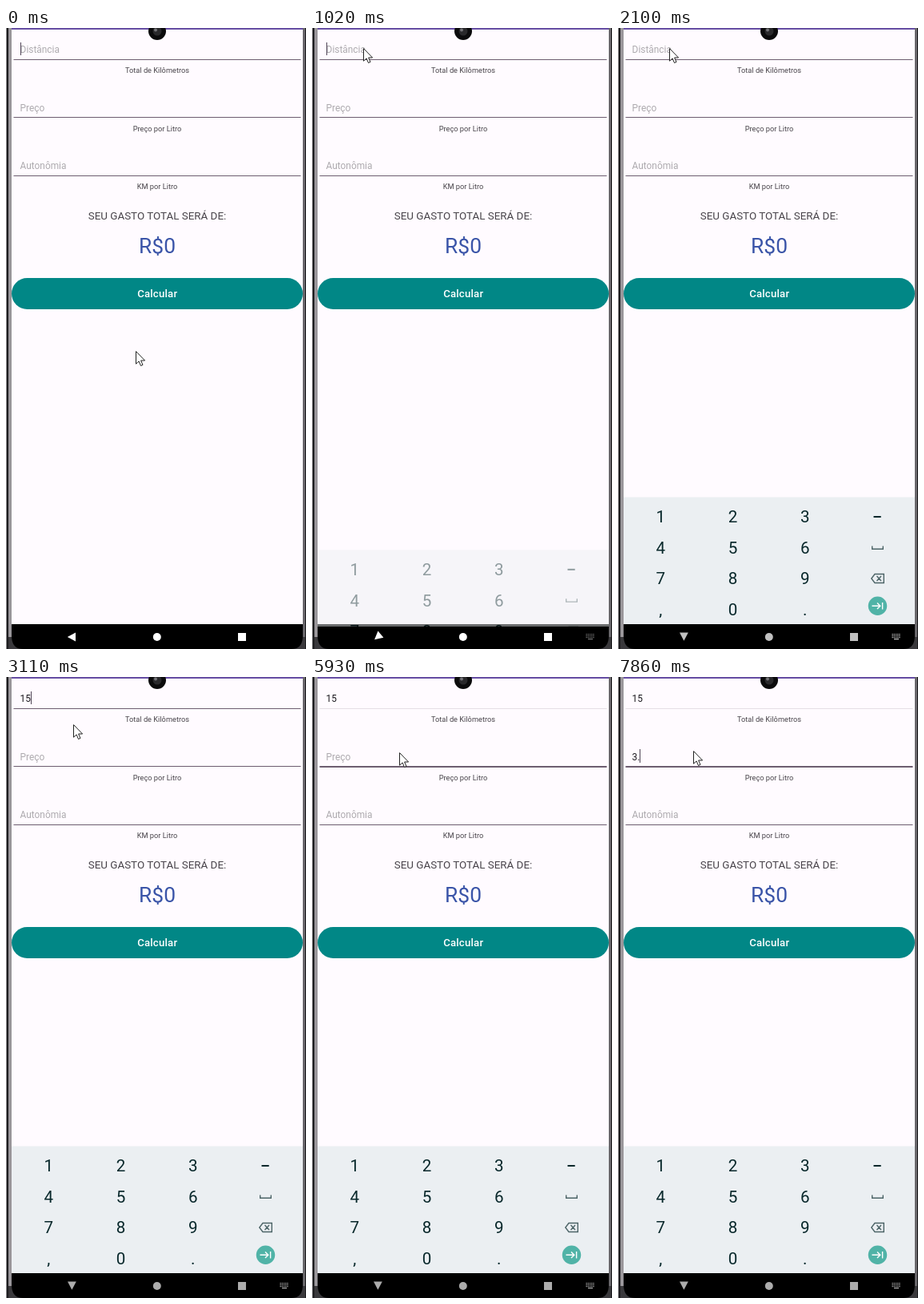
Recreate the animation shown at these times as an HTML page. Size 375 px wide and 775 px high, loop 8000 ms.

```html
<!DOCTYPE html>
<html lang="pt">
<head>
<meta charset="utf-8">
<title>Calculadora de gasto</title>
<style>
  html, body { margin: 0; width: 100%; height: 100%; overflow: hidden; background: #fffbff; }
  svg { display: block; width: 375px; height: 775px; }
  text { font-family: Roboto, "Noto Sans", sans-serif; }
  .mid { text-anchor: middle; }
  .label { font-size: 9.25px; fill: #49454b; }
  .hint, .value { font-size: 11.88px; }
  .hint { fill: #aeabaf; }
  .hint.pressed { fill: #7b777d; }
  .value { fill: #1d1b20; }
  .key { font-size: 20.6px; fill: #08282b; text-anchor: middle; }
  .glyph { fill: none; stroke: #4c6467; stroke-width: 1.4; }
  #tap { mix-blend-mode: multiply; }
</style>
</head>
<body>
<svg viewBox="0 0 375 775">
  <!-- phone body -->
  <rect width="375" height="775" fill="#1b1b1d"/>
  <rect width="1" height="775" fill="#8b898c"/>
  <rect x="3" width="4" height="775" fill="#9a979b"/>
  <rect x="371" width="3" height="775" fill="#69676b"/>
  <path d="M3 760H374V775H3Z" fill="#3a393c"/>
  <path d="M7 744H371V758Q371 775 357 775H21Q7 775 7 758Z" fill="#000"/>

  <!-- app -->
  <rect x="7" width="364" height="744" fill="#fffbff"/>
  <rect x="7" width="364" height="2" fill="#6750a4"/>
  <circle cx="189" cy="4" r="11" fill="#0b0b0c"/>
  <circle cx="189" cy="4" r="5.5" fill="#29292b"/>
  <circle cx="187" cy="2.5" r="2" fill="#737377"/>
  <g id="fields"></g>
  <text class="mid" x="189" y="239.2" font-size="13.4" fill="#49454b">SEU GASTO TOTAL SERÁ DE:</text>
  <text class="mid" x="189" y="280.8" font-size="26.4" fill="#3a54a8">R$0</text>
  <rect x="7" y="312" width="364" height="39" rx="19.5" fill="#018786"/>
  <text class="mid" x="189.2" y="336.2" font-size="13.2" font-weight="500" letter-spacing=".2" fill="#fff">Calcular</text>

  <!-- keyboard -->
  <clipPath id="screen"><rect x="7" width="364" height="747"/></clipPath>
  <g clip-path="url(#screen)">
    <g id="board">
      <rect x="7" y="585.5" width="364" height="158.5" fill="#ebeff2"/>
      <g id="keys"></g>
      <path class="glyph" d="M319.5 610H328.7" style="stroke:#08282b;stroke-width:2"/>
      <path class="glyph" d="M317.7 646.5V650.3H331.3V646.5"/>
      <path class="glyph" d="M321 681.5H332.3V692.5H321L316.8 687ZM323.5 684L329 690M329 684L323.5 690"/>
      <circle cx="324.5" cy="721.3" r="11.7" fill="#50b3a7"/>
      <path class="glyph" d="M317.5 721.3H327.5M324 717.5L327.8 721.3L324 725.1M330.6 717V725.6" style="stroke:#fff"/>
    </g>
  </g>

  <!-- navigation bar -->
  <g id="nav">
    <path id="back" d="M-5.6 0L4.6 -5.4V5.4Z"/>
    <circle cx="188.8" cy="760" r="5"/>
    <rect x="290" y="755" width="10" height="10"/>
    <g id="switcher"></g>
  </g>

  <rect id="caret" width="1" fill="#4f4456"/>
  <path id="pointer" d="M.5 .6V16.2L4.1 12.9L6.5 18.5L9 17.4L6.6 12H11.6Z" fill="#fff" stroke="#222"/>
  <circle id="tap" r="12" fill="#fffa76"/>
</svg>
<script>
const LOOP = 8000, FRAME = 78, BLINK = 490, TEXT_X = 17.6, ROW = 72.6;
const KEYBOARD = 980, DIM = 1800, FOCUS = 3920;
const clicks = [780, 3820];

// What is typed where: time, field, text
const edits = [
  [-360, 0, ""], [2330, 0, "1"], [3030, 0, "15"],
  [3990, 1, ""], [6930, 1, "3"], [7860, 1, "3."]
];
// Pointer strokes: start, end, target point
const strokes = [
  [70, 310, 78, 44], [540, 700, 64, 25], [3030, 3270, 104, 94],
  [3510, 3740, 111, 94], [5930, 6540, 94, 92]
];

const $ = id => document.getElementById(id);
const clamp = v => Math.min(1, Math.max(0, v));
const mix = (a, b, p) => a + (b - a) * p;
const ramp = (t, start, length) => clamp((t - start) / length);
const gray = v => `rgb(${v},${v},${v})`;

function set(el, attrs) {
  for (const k in attrs) el.setAttribute(k, attrs[k]);
}

function add(parent, tag, attrs, text = "") {
  const el = document.createElementNS("http://www.w3.org/2000/svg", tag);
  set(el, attrs);
  el.textContent = text;
  return parent.appendChild(el);
}

const fields = [
  ["Distância", "Total de Kilômetros"],
  ["Preço", "Preço por Litro"],
  ["Autonômia", "KM por Litro"]
].map(([hint, label], i) => {
  const base = 31 + i * ROW;
  const y = Math.floor(39.2 + i * ROW) + .5;
  const line = add($("fields"), "path", { d: `M9.5 ${y}H368.5`, stroke: "#6d5e70" });
  add($("fields"), "text", { class: "label mid", x: 189, y: base + 25 }, label);
  return { hint, line, text: add($("fields"), "text", { x: TEXT_X, y: base }) };
});

["123", "456", "789", ",0."].forEach((row, r) =>
  [...row].forEach((c, i) =>
    add($("keys"), "text", { class: "key", x: 53.3 + i * 90.2, y: 617.2 + r * 38.6 }, c)));

for (let i = 0; i < 15; i++) {
  add($("switcher"), "rect", { x: 342.5 + i % 5 * 2.2, y: 756 + (i / 5 | 0) * 2, width: 1.3, height: 1.2 });
}
add($("switcher"), "rect", { x: 345, y: 762, width: 6, height: 1.2 });

function pointerAt(t) {
  let x = 162, y = 403;
  for (const [start, end, tx, ty] of strokes) {
    if (t < start) break;
    const step = (Math.floor((t - start) / FRAME) + 1) * FRAME;
    const p = clamp(step / (end - start + FRAME));
    x = mix(x, tx, p);
    y = mix(y, ty, p);
  }
  return [Math.round(x), Math.round(y)];
}

function drawPointer(t) {
  const [x, y] = pointerAt(t);
  set($("pointer"), { transform: `translate(${x} ${y})` });
  const down = clicks.some(c => t >= c && t < c + 2 * FRAME);
  set($("tap"), { cx: x, cy: y, opacity: +down });
}

function drawFields(t) {
  const done = edits.filter(e => e[0] <= t);
  const [since, active] = done.at(-1);
  fields.forEach((f, i) => {
    const value = done.findLast(e => e[1] === i)?.[2];
    const pressed = ramp(t, clicks[i] + FRAME, 2 * FRAME) % 1 > 0;
    f.text.textContent = value || f.hint;
    set(f.text, { class: value ? "value" : pressed ? "hint pressed" : "hint" });
    f.width = value ? f.text.getComputedTextLength() : 0;
  });

  const on = Math.floor((t - since) / BLINK) % 2 === 0;
  set($("caret"), {
    x: Math.round(TEXT_X + fields[active].width),
    y: 18 + Math.floor(active * ROW),
    height: on ? 16 + active : 0
  });

  const focus = ramp(t, FOCUS, 130);
  set(fields[0].line, { "stroke-opacity": mix(1, .18, focus) });
  set(fields[1].line, { "stroke-width": 1 + focus, transform: `translate(0 ${focus / 2})` });
}

function drawKeyboard(t) {
  const left = 1 - ramp(t, KEYBOARD, 160);
  const opacity = 1 - left ** 2;
  set($("board"), { transform: `translate(0 ${160 * left ** 3})`, opacity });
  set($("switcher"), { opacity });

  const turn = 1 - Math.exp(-Math.max(0, t - KEYBOARD) / 70);
  set($("back"), { transform: `translate(82.4 ${760 - turn * .8}) rotate(${-90 * turn})` });
  set($("nav"), { fill: gray(Math.round(mix(255, 172, ramp(t, DIM, 400)))) });
}

const start = performance.now();
function tick() {
  const t = (performance.now() - start) % LOOP;
  drawPointer(t);
  drawFields(t);
  drawKeyboard(t);
  requestAnimationFrame(tick);
}
tick();
</script>
</body>
</html>
```
